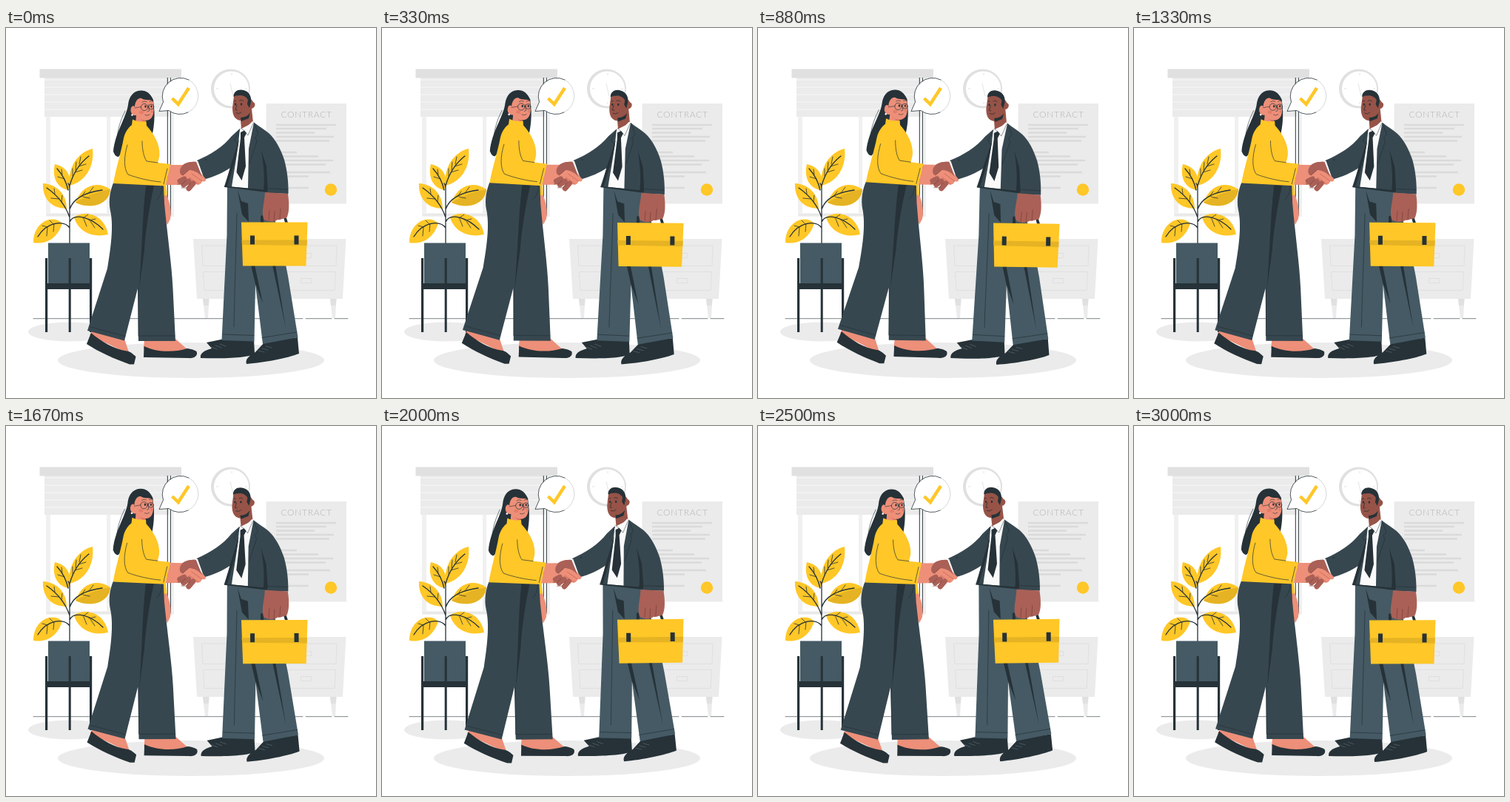
Write an HTML page that moves like this. It is 500 by 500 pixels and loops after 3040 ms.

```html
<!DOCTYPE html>
<html lang="en">
<head>
<meta charset="utf-8">
<title>Handshake</title>
<style>
html, body { margin: 0; width: 100%; height: 100%; overflow: hidden; background: #fff; }
svg { display: block; width: 100vw; height: 100vh; }
.ink { fill: #263238; }
.gold { fill: #ffc727; }
.shade { fill: #e5b323; }
.slate { fill: #37474f; }
.steel { fill: #455a64; }
.skin { fill: #ed8f79; }
.brown { fill: #975347; }
.hand { fill: #aa6056; }
.pale { fill: #ebebeb; }
.grey { fill: #e0e0e0; }
.line { fill: none; stroke: #263238; stroke-linecap: round; stroke-linejoin: round; }
.soft { fill: none; stroke: #dcdcdc; }
.crease { fill: none; stroke: #6d3b36; stroke-linecap: round; }
text { font: 300 12px Lato, sans-serif; letter-spacing: .7px; fill: #b4b4b4; }
</style>
</head>
<body>
<svg viewBox="0 0 500 500" stroke-width=".8">
  <!-- window -->
  <path fill="#f0f0f0" d="M54 67h173v188H54zM60 67v183h76V67zM141 67v183h81V67z" fill-rule="evenodd"/>
  <rect class="pale" x="52" y="67" width="168" height="53"/>
  <path id="slats" stroke="#fafafa"/>
  <rect class="grey" x="45.500" y="55.500" width="191.500" height="12"/>
  <path class="line" d="M218.300 67.500V253M222.300 67.500V253" stroke-width="1"/>
  <path class="soft" d="M55 252.500H224"/>

  <!-- clock -->
  <circle cx="303.500" cy="82" r="26.500" class="grey"/>
  <circle cx="304.500" cy="82" r="23.500" fill="#fff"/>
  <path class="soft" d="M303 75L307 92M305 61v3M305 100v3M284 82h3M323 82h3"/>

  <!-- contract -->
  <rect class="pale" x="351.500" y="102" width="108.500" height="135.500"/>
  <text x="406" y="121" text-anchor="middle">CONTRACT</text>
  <path id="rows" stroke="#dadada" stroke-width="2.300"/>
  <circle class="gold" cx="439" cy="218.500" r="8.200"/>

  <!-- cabinet -->
  <path class="pale" d="M253 285H459.500L455 366H258zM266 366h8.500L273 392h-4zM438 366h8.500L445 392h-4z"/>
  <path class="grey" d="M266 366h8.500l-.7 9H267zM438 366h8.500l-1 9h-6.500z"/>
  <path class="soft" d="M264.500 294H447L446 321.500H266zM266.500 329.500H445.500L444 354.500H268zM398.500 304.500h14v6h-14zM398.500 338.500h14v6h-14z"/>

  <!-- floor -->
  <path class="line" d="M37 392.700H401M405 392.700H440M444 392.700H462" stroke-width=".6"/>
  <ellipse class="pale" cx="86" cy="410.500" rx="56" ry="13"/>
  <ellipse class="pale" cx="250" cy="449" rx="180" ry="24"/>

  <!-- plant -->
  <path class="gold" d="M86 213C83 190 96 168 117 163C120 186 108 208 86 213zM84 219C68 216 62 200 66 184C82 187 91 201 84 219zM94 236C101 214 122 205 141 218C139 240 113 245 94 236zM82 244C61 244 49 230 50 210C69 211 82 225 82 244zM76 264C63 251 37 262 37 290C56 293 70 283 76 264zM92 256C104 246 133 250 138 279C118 284 98 276 92 256z"/>
  <path class="shade" d="M94 236Q118 221 141 218C139 240 113 245 94 236z"/>
  <path class="line" d="M86 291V213M86 213Q93 188 112 173M84 219Q80 202 69 190M86 219Q86 212 84 210M86 245Q93 224 130 219M86 256Q78 232 55 216M86 270C78 259 55 262 43 282M86 262C92 249 115 256 131 272" stroke-width="1.300"/>
  <path class="line" d="M90 200L90 190M94 192L95 181M99 184L101 174M93 195L103 192M98 187L108 184M79 204L70 201M76 198L75 191M102 228L107 221M112 223L118 215M104 228L113 230M72 231L61 230M66 224L65 217M75 235L76 226M64 265L59 260M56 269L49 267M65 265L64 275M56 270L55 281M104 257L111 252M112 260L121 258M105 258L109 268M114 261L120 270"/>
  <path class="steel" d="M57 290.500H113V346H57z"/>
  <path class="ink" d="M54 345H115.500V353H54zM53 311h3.200V411H53zM84.700 311h3V411h-3zM113 311h3.200V411H113z"/>

  <!-- speech bubble -->
  <path fill="#fff" d="M212.500 100A24.800 24.800 0 1 1 220 111.500L207 112.500z"/>
  <path class="line" d="M247 70A24.800 24.800 0 0 0 212.500 100L207 112.500L220 111.500A24.800 24.800 0 0 0 246 114"/>
  <path class="line" stroke-width=".2" d="M247 70A24.800 24.800 0 0 1 246 114"/>
  <path d="M224.500 95L232.800 103L247 81" fill="none" stroke="#ffc727" stroke-width="4.500"/>

  <g id="pair">
    <!-- woman: far arm, hair, head -->
    <path class="skin" d="M210 225L217 224C221 236 224 246 222 258L218 266L215 260L213 250z"/>
    <path class="gold" d="M206 206L216 210L217.500 226L210 227z"/>
    <path class="ink" d="M182 84.500C171 85 166 94 165 104C163 120 147 142 145 167C147 172 149 174 152 174L164 160L193 160C198 146 201 132 200.500 113L199 97C195 88 189 84 182 84.500z"/>
    <path class="line" stroke-width=".6" d="M161 112C153 128 149 144 150 158"/>
    <path class="skin" d="M174 105C175 98 179 94 183 95C189 99 196 95 199 100L199.500 112C199 121 195 125 188 125L188 130L175 129L176 118C171 119 167 114 169 108C170 105 173 104 174 107z"/>
    <path fill="#d76a58" d="M179 121C183 124 186 125 189 125L188 128z"/>
    <g fill="#e37d69"><ellipse cx="183" cy="114" rx="3" ry="2.200"/><ellipse cx="197.500" cy="113" rx="1.700" ry="2"/></g>
    <path class="line" stroke-width=".6" d="M174 108L182.500 106.500M191.800 106.500L192.700 106M184 100Q187 98 190 99.500M194 99.500Q196 98 198 99M192 104L193.500 112L191 113M188 117.500Q191 119.500 194 117"/>
    <g class="line" stroke-width=".7"><circle cx="187" cy="107" r="4.600"/><circle cx="196.300" cy="106.500" r="3.500"/></g>
    <g class="ink"><ellipse cx="188.500" cy="106" rx="1.200" ry="1.700"/><ellipse cx="196.500" cy="106" rx="1.100" ry="1.700"/></g>
    <circle cx="170.500" cy="117.500" r="1.300" fill="#fff"/>

    <!-- woman: feet, trousers -->
    <path class="skin" d="M117 408L160 420L167 441L113 415zM187 420H229L248 437L200 441L186 433z"/>
    <path class="ink" d="M115 412C129 424 146 434 163 436.500C168 437 172 441 175.500 444L173 454.500L167 454.500C146 447 126 438 109 427zM186.500 430C203 438 226 439 245 433Q253 434 257.500 437C260 443 254 447 246 446L186 445z"/>
    <path class="slate" d="M145 209.500L213 211L214 237C218 280 224 320 225.500 352L229 423H179L178 352L160 422.500L110 409L137 325C143 290 145 265 141 247C138 233 141 219 145 209.500z"/>
    <path class="ink" d="M189 213H200C195 235 189 270 187 300L180 352C184 300 184 255 189 213z"/>
    <path class="line" d="M179 352V416M114 404L161 416.500M180 416H228M211 213C211 222 208 228 204 232" stroke-width=".7"/>

    <!-- woman: top -->
    <path class="gold" d="M171 123.500C178 127 184 127 189.500 126L190 132C200 143 208 157 207.500 171C207 176 206 179 205 182L222.500 184L216 213.500L145 210C148 192 155 170 159 149C161 140 166 134 170 131z"/>
    <path class="line" d="M164 158C159 175 159 190 165 198C178 203 196 207 209 208M184 153C184 164 186 174 190 180L205 182M213 211L218 190" stroke-width=".7"/>

    <!-- man: shoes, trousers -->
    <path class="ink" d="M271 425L300 419L335 421L336 440C329 446 292 447 263 446C262 440 267 436 278 433zM350 424L394 418L396 440C381 446 350 452 325 454C323 448 328 443 337 438z"/>
    <path class="line" style="stroke:#607079" stroke-width=".6" d="M277 431L285 434M283 429L291 432M289 427L297 430M341 436L349 438M346 433L354 435M351 430L359 432"/>
    <path class="steel" d="M299 214L354 219C361 254 373 291 381 335L394.500 418L347 427L337 346L335.500 423.500L291.500 422L298.500 280z"/>
    <path class="ink" d="M313 219L318 234L327 237L328 262L319 252zM331 320H336L347 372L337 346zM360 320H364L378 405z"/>
    <path class="line" d="M312 250C311 300 309 350 308 404M293 414L335 415.500M346 418.500L393 411" stroke-width=".7"/>

    <!-- man: head -->
    <path class="brown" d="M308 92L306 108C306 118 309 124 317 125L318 136L334 128L332 109C337 108 338 101 334 100C330 92 319 88 308 92z"/>
    <path class="ink" d="M307.500 93C307 85 315 82 321 84C329 86 332 93 331 100L329 108L326 103L327 97C323 90 314 90 307.500 93zM317 121C322 121 327 119 330 114L328 122L318 126z"/>
    <path class="line" d="M308 99Q309 97 311 98.500M315.500 98Q318 96 320.500 98.500M312 104L310 110.500L312.500 111M311 115Q315 117 318 114"/>
    <g class="ink"><ellipse cx="310" cy="103" rx="1.100" ry="1.700"/><ellipse cx="318" cy="103" rx="1.200" ry="1.800"/></g>

    <!-- man: shirt, tie, jacket -->
    <path fill="#fafafa" d="M316 136L322 137L333 126L338 131L330 158L327.500 214H304L311 170z"/>
    <path class="ink" d="M317 141L322 138.500L325 142L322 148L324 187L318.500 206L311.500 195L317 149z"/>
    <path class="line" stroke-width=".5" d="M317 135L321 138L327 145L334 129"/>
    <path class="slate" d="M316 136L305 146C294 160 277 171 258 179L266 205C282 201 294 195 303 189L295 214L305 215C308 194 313 170 316 136z"/>
    <path class="slate" d="M335 127.500C342 133 349 137 355 142C364 150 371 163 376 178C380 192 382 209 381.500 224L355 223L353 221L327 218L328 163z"/>
    <path class="ink" d="M345 165L352 187L354 220L348 219C350 202 348 184 345 165zM315 150L303 188L296 214H299C305 194 312 174 315 150z"/>
    <path class="ink" d="M295 213.500L327 216.500L353 219V222L295 215z"/>
    <path class="line" d="M335 128L341 143L337 148L339 153L329 183M316 137L309 151L313 157M355 217L381 218" stroke-width=".7"/>
    <path d="M258 180L267 205.500" stroke="#fafafa" stroke-width="2.500"/>
    <circle class="ink" cx="270" cy="178" r="1"/>

    <!-- handshake -->
    <path class="hand" d="M236 188C240 183 248 180 257 181L266 204L257 210L239 199z"/>
    <path class="skin" d="M222 185L238 185C247 187 257 191 262 195L270 204C271 207 268 208 265 207C264 211 260 213 256 211C248 213 240 210 234 212L216 212z"/>
    <path class="hand" d="M235 193C236 184 246 180 257 181L265 201C259 194 252 192 247 192L239 199C236 199 235 196 235 193z"/>
    <path class="line" style="stroke:#aa6056" stroke-width="7" d="M235 207L241 204M240 212L247 207M247 217L253 210"/>
    <path class="crease" stroke-width=".6" d="M232 211L238 211L243 206M237 216L244 216L249 210M239 199L247 192"/>
    <path class="line" style="stroke:#b85b4a" stroke-width=".6" d="M251 197L265 207M248 202L260 211"/>

    <!-- man: hand and case -->
    <path class="ink" d="M344 263V254Q361 247 378 254L381 263h-4L375 256H348V263z"/>
    <path class="hand" d="M350 222L381 224C383 238 383 250 379 257C374 257 371 260 367 259C362 263 352 262 348 258C345 246 349 238 350 222z"/>
    <path class="crease" stroke-width=".6" d="M356 247L355 260M363 248L362 261M371 244L370 258"/>
    <path class="gold" d="M318 262.500H407.500L405.500 321.500H320z"/>
    <path class="shade" d="M318.500 286.500H407L406.500 294L319 293z"/>
    <path class="ink" d="M330 280.500h6v12h-6zM389.500 280.500h6v12h-6z"/>
  </g>
</svg>
<script>
const get = id => document.getElementById(id);
const PERIOD = 3040;

get('slats').setAttribute('d', [70, 80, 90, 100, 110].map(y => `M52 ${y}H220`).join(''));

// y position and right end of each text row
const rows = [[131, 446], [136, 433], [141.5, 417], [147, 443], [152.5, 437], [168, 393],
  [173.5, 422], [179, 442], [184.5, 432], [195, 438], [200.5, 409], [216, 409]];
get('rows').setAttribute('d', rows.map(([y, x]) => `M365 ${y}H${x}`).join(''));

// Triangle wave: 0 to 1 to -1 to 0 degrees
const sway = p => p < .25 ? 4 * p : p < .75 ? 2 - 4 * p : 4 * p - 4;

const start = performance.now();
function draw() {
  const phase = (performance.now() - start) % PERIOD / PERIOD;
  get('pair').setAttribute('transform', `rotate(${sway(phase)} 257 268)`);
  requestAnimationFrame(draw);
}
draw();
</script>
</body>
</html>
```
